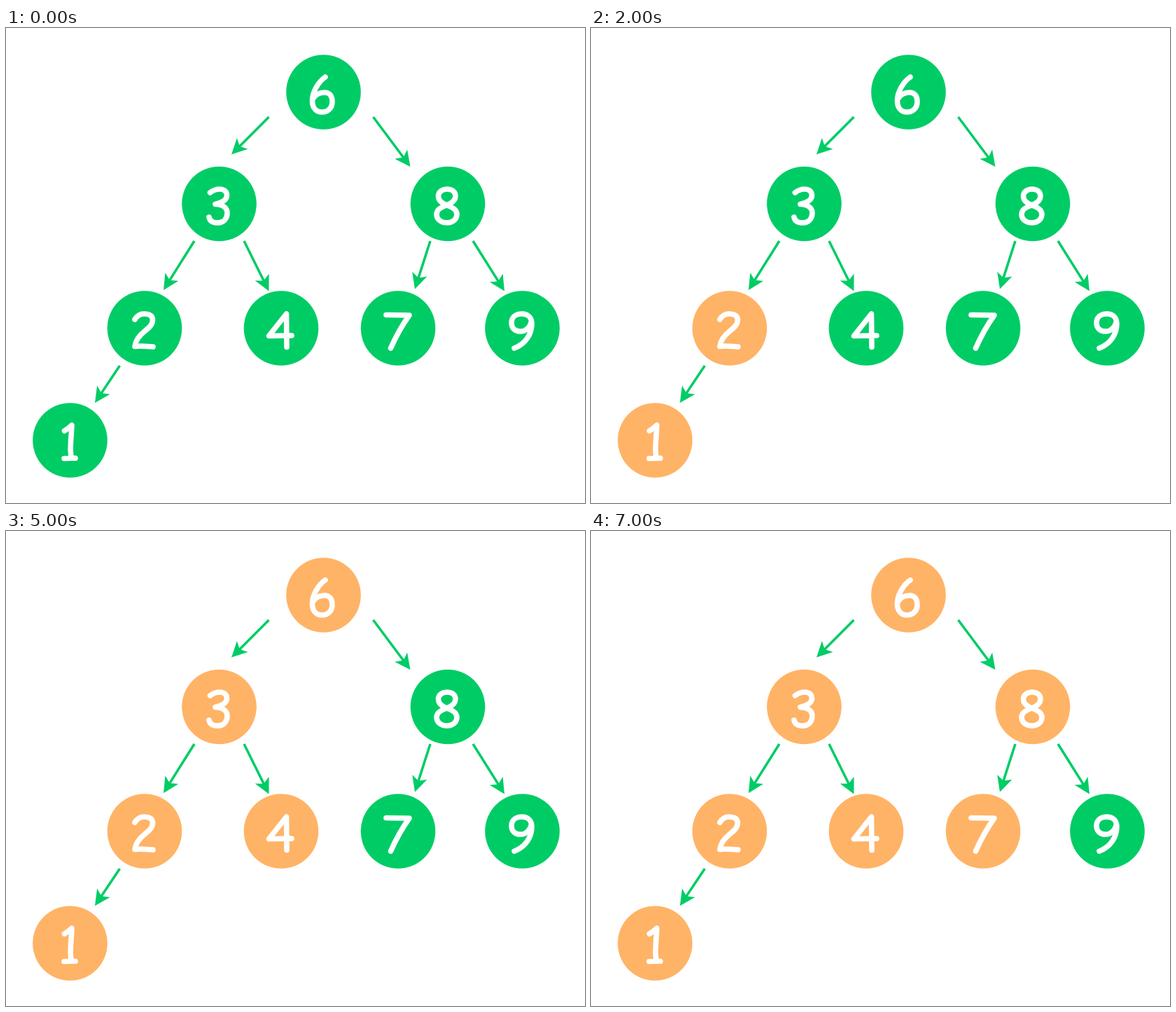
Write an HTML page that moves like this. It is 827x678 px and loops after 8000 ms.

```html
<!DOCTYPE html>
<html lang="en">
<head>
<meta charset="utf-8">
<title>In-order traversal</title>
<style>
  html, body { margin: 0; height: 100%; overflow: hidden; background: #fff; }
  svg { display: block; width: 100%; height: 100%; }
  .node { fill: #00cc66; }
  .digit { fill: none; stroke: #fff; stroke-width: 7.6; stroke-linecap: round; stroke-linejoin: round; }
  .arrow { fill: #00cc66; stroke: #00cc66; stroke-width: 3.55; stroke-miterlimit: 10; }
</style>
</head>
<body>
<svg id="stage" viewBox="0 0 827 678" role="img" aria-label="Binary search tree visited in order: 1 2 3 4 6 7 8 9"></svg>
<script>
const GREEN = '#00cc66', ORANGE = '#ffb366';
const LOOP = 8000, STEP = 1000, RADIUS = 53.3;
const stage = document.getElementById('stage');

// Nodes in visiting order: centre and handwritten digit strokes
const nodes = [
  { x: 91.5, y: 588.5, d: 'M83.5 575 Q90 571 94 567 Q93.5 578 92.5 590 Q91.5 602 93 613 M83 614.5 L99 614' },
  { x: 198, y: 428.5, d: 'M184 416 C187 411 191 408 197 408 C205 408 209.500 411 209.500 416.500 C209.500 423 205 427 199 432 C190 439 185 446 184 454.500 C193 453 200 454.500 210 455' },
  { x: 304.5, y: 251, d: 'M291.500 235 C296 231.500 300 230 305 230 C312 230 315.500 234 315.500 239 C315.500 245 309 249 299 251.500 C310 252 316 257 316 264 C316 273 310 278 302 278 C295 278 291 275 290 270' },
  { x: 393, y: 428.5, d: 'M408 439 L375.500 439.500 L400.500 408 L401 455.500' },
  { x: 453.5, y: 91.5, d: 'M456 70 C446 77 437.500 91 437.500 104 C437.500 114 443 120 451.500 120 C460 120 466 114 466 105 C466 97 462 92 455 92 C448 92 442 95 438.500 101' },
  { x: 560, y: 428.5, d: 'M543 409.500 L576 410 C566 424 557 440 549.500 457' },
  { x: 631, y: 251, d: 'M629.500 253 C622 250 617.500 246 617.500 240 C617.500 234 623 230 630 230 C637 230 642 234 642 240 C642 246 637 250 629.500 253 C620 256 615 260 615 266 C615 273 621 278 630 278 C638 278 644 273 644 266 C644 260 639 256 629.500 253 Z' },
  { x: 737.5, y: 428.5, d: 'M750.500 419 C748 428 742 433 735 433 C727 433 722 428 722 421 C722 413 728 408 737 408 C746 408 751 414 751 422 C751 437 742 451 726 457' }
];

// Start and tip of each edge
const edges = [
  [375.5, 127, 322, 180.5], [524.5, 127, 577.5, 198],
  [269, 304, 225, 374], [340, 304, 375.5, 375.5],
  [606, 304, 584, 372.5], [667, 304, 712, 375.5],
  [162.5, 482, 127, 535]
];

function add(tag, attrs) {
  const el = document.createElementNS('http://www.w3.org/2000/svg', tag);
  for (const key in attrs) el.setAttribute(key, attrs[key]);
  stage.append(el);
  return el;
}

for (const [x1, y1, x2, y2] of edges) {
  const length = Math.hypot(x2 - x1, y2 - y1);
  const angle = Math.atan2(y2 - y1, x2 - x1) * 180 / Math.PI;
  add('path', {
    class: 'arrow',
    transform: `translate(${x2} ${y2}) rotate(${angle})`,
    d: `M${-length} 0 H-14.6 M-4 0 L-18.2 -7.1 L-14.6 0 L-18.2 7.1 Z`
  });
}

nodes.forEach(({ x, y, d }, i) => {
  const disc = add('circle', { class: 'node', cx: x, cy: y, r: RADIUS });
  add('path', { class: 'digit', d });
  const offset = (i + 1) * STEP / LOOP;
  if (offset < 1) {
    disc.animate([
      { fill: GREEN, offset: 0, easing: 'step-end' },
      { fill: ORANGE, offset },
      { fill: ORANGE, offset: 1 }
    ], { duration: LOOP, iterations: Infinity });
  }
});
</script>
</body>
</html>
```
